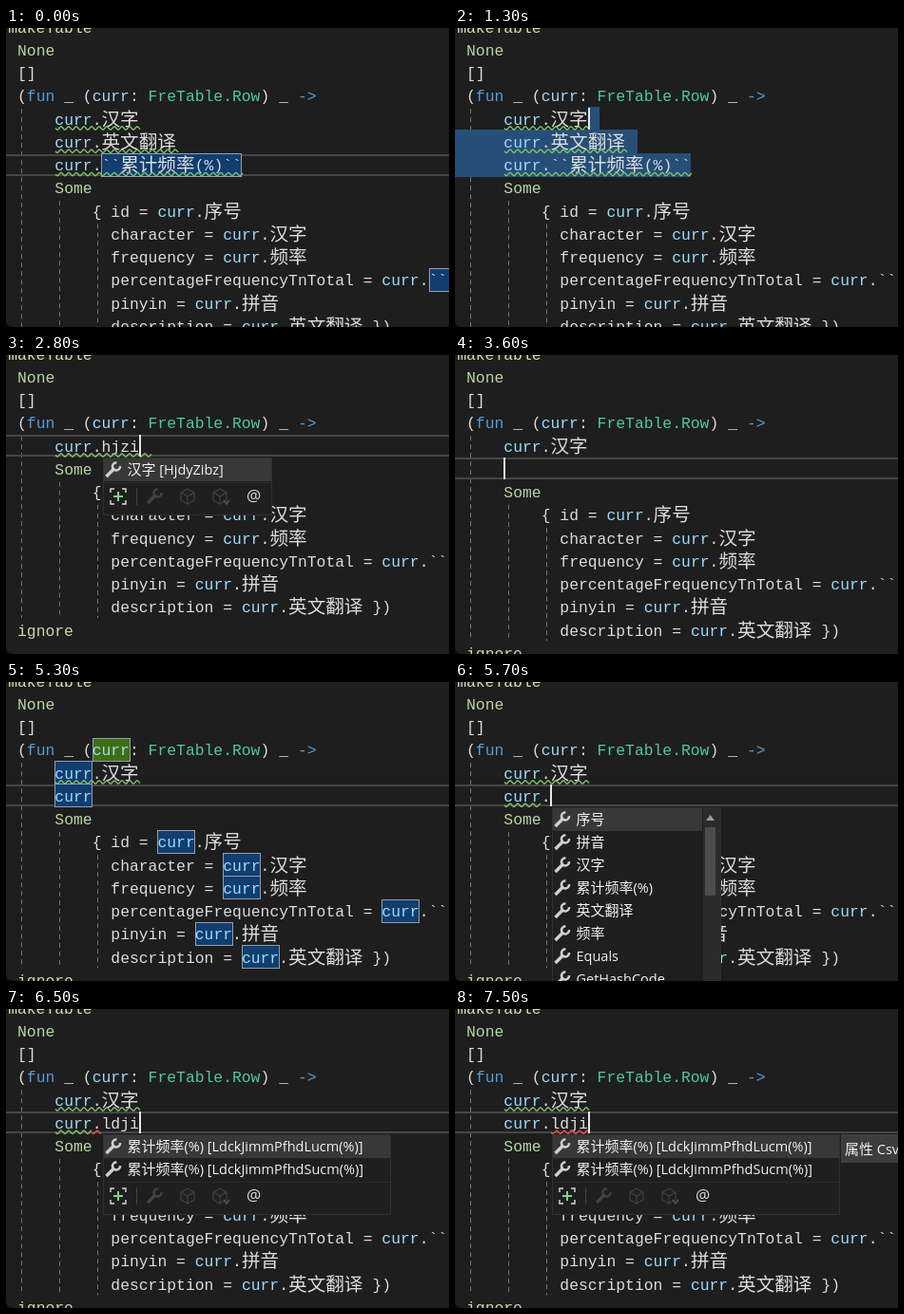
Write an HTML page with a canvas that moves like this. It is 466 px wide and 315 px high and loops after 8 s.

```html
<!DOCTYPE html>
<html lang="zh-CN">
<head>
<meta charset="utf-8">
<style>
html, body { margin: 0; width: 100%; height: 100%; overflow: hidden; background: #1e1e1e; }
canvas { display: block; }
</style>
</head>
<body>
<canvas id="stage" width="466" height="315"></canvas>
<script>
const ctx = document.getElementById('stage').getContext('2d');
const LOOP = 8000, LEFT = 12, CHAR = 9.83, PITCH = 24.25;
const CJK = '"Noto Sans CJK SC", "Noto Sans CJK JP", sans-serif';
const CODE_LATIN = '16.38px "Liberation Mono", monospace';
const CODE_CJK = '300 19.6px ' + CJK;
const GREEN = '#7fbf6a', RED = '#f0483f', WHITE = '#dcdcdc';
const BLUE_MARK = '#113d6f', GREEN_MARK = '#406f11';
const COLORS = {
  curr: '#9cdcfe', fun: '#569cd6', '->': '#569cd6', 'FreTable.Row': '#4ec9a0',
  None: '#b8d7a3', Some: '#b8d7a3', makeTable: '#dcdcaa', ignore: '#cdd6a6'
};
const TOKENS = /curr|fun|->|FreTable\.Row|None|Some|makeTable|ignore|[\u4e00-\u9fff]+|[^\u4e00-\u9fff]/g;
const isCjk = s => /[\u4e00-\u9fff]/.test(s);
const columns = s => [...s].reduce((n, c) => n + (isCjk(c) ? 2 : 1), 0);
const colX = col => LEFT + col * CHAR;
const lineTop = row => -13.8 + row * PITCH;
// Latest value whose start time has passed.
const stepAt = (t, steps) => steps.reduce((v, [start, next]) => t >= start ? next : v, undefined);
const between = (t, a, b) => t >= a && t < b;

const HEAD = [[-1, 'makeTable'], [0, 'None'], [0, '[]'], [0, '(fun _ (curr: FreTable.Row) _ ->']];
const TAIL = [
  [4, 'Some'], [8, '{ id = curr.序号'], [10, 'character = curr.汉字'], [10, 'frequency = curr.频率'],
  [10, 'percentageFrequencyTnTotal = curr.``'], [10, 'pinyin = curr.拼音'],
  [10, 'description = curr.英文翻译 })'], [0, 'ignore']
];
const MEMBERS = ['序号', '拼音', '汉字', '累计频率(%)', '英文翻译'];
const MATCHES = ['累计频率(%) [LdckJimmPfhdLucm(%)]', '累计频率(%) [LdckJimmPfhdSucm(%)]'];

function rect(x, y, w, h, fill, border) {
  ctx.fillStyle = fill;
  ctx.fillRect(x, y, w, h);
  if (!border) return;
  ctx.strokeStyle = border;
  ctx.lineWidth = 1;
  ctx.strokeRect(x + .5, y + .5, w - 1, h - 1);
}

function line(color, width, ...points) {
  ctx.strokeStyle = color;
  ctx.lineWidth = width;
  ctx.beginPath();
  points.forEach(([x, y]) => ctx.lineTo(x, y));
  ctx.stroke();
}

function drawCode(col, text, row) {
  const baseline = Math.round(lineTop(row) + 18.4);
  for (const token of text.match(TOKENS) || []) {
    const wide = isCjk(token);
    ctx.font = wide ? CODE_CJK : CODE_LATIN;
    ctx.fillStyle = COLORS[token] || WHITE;
    ctx.fillText(token, colX(col), baseline + (wide ? 1 : 0));
    col += columns(token);
  }
}

function mark(row, col, count, fill = BLUE_MARK) {
  const x = Math.round(colX(col)), y = Math.round(lineTop(row));
  rect(x, y, Math.round(count * CHAR) + 1, 25, fill, '#909faf');
}

function squiggle(row, from, to, color) {
  const y = lineTop(row) + 22.3, points = [];
  for (let x = from; x <= to; x++) points.push([x, y + 1.7 * Math.sin((x - from) * Math.PI / 4)]);
  line(color, 1.3, ...points);
}

function guide(x, first, last) {
  ctx.setLineDash([5, 4]);
  line('#747474', 1, [x + .5, lineTop(first) + 2], [x + .5, lineTop(last + 1)]);
  ctx.setLineDash([]);
}

// With emphasis, the first capital L (the typed letter) is bold.
function uiText(text, x, y, emphasis) {
  ctx.fillStyle = '#f0f0f0';
  for (const run of text.match(/[\u4e00-\u9fff]+|L|[^L\u4e00-\u9fff]+/g)) {
    const bold = emphasis && run === 'L';
    if (bold) emphasis = false;
    ctx.font = isCjk(run) ? '15px ' + CJK : (bold ? 'bold ' : '') + '14.5px "Open Sans", sans-serif';
    ctx.fillText(run, x, y + 4.5);
    x += ctx.measureText(run).width;
  }
}

function wrench(x, y, color) {
  line(color, 3.4, [x - 7, y + 7], [x + 1, y - 1]);
  ctx.lineWidth = 2.6;
  ctx.beginPath();
  ctx.arc(x + 3.5, y - 3.5, 4, -.1, 2 * Math.PI - 1.47);
  ctx.stroke();
}

function cube(x, y) {
  const dim = '#424242';
  line(dim, 1.2, [x, y - 8], [x + 7, y - 4], [x + 7, y + 4], [x, y + 8], [x - 7, y + 4], [x - 7, y - 4], [x, y - 8]);
  line(dim, 1.2, [x - 7, y - 4], [x, y], [x + 7, y - 4]);
  line(dim, 1.2, [x, y], [x, y + 8]);
}

function toolbar(top, right) {
  const y = top + 15;
  line('#2b2b2b', 1, [103, top + .5], [right - 1, top + .5]);
  for (const side of [-1, 1]) {
    line(WHITE, 1.4, [118 + side * 4, y - 8], [118 + side * 8, y - 8], [118 + side * 8, y - 4]);
    line(WHITE, 1.4, [118 + side * 4, y + 8], [118 + side * 8, y + 8], [118 + side * 8, y + 4]);
  }
  line('#7fd37f', 2, [113, y], [123, y]);
  line('#7fd37f', 2, [118, y - 5], [118, y + 5]);
  line('#424242', 1, [137.5, y - 9], [137.5, y + 9]);
  wrench(156, y, '#424242');
  cube(191, y);
  cube(225, y);
  line('#555', 1.6, [229, y + 4], [232, y + 8], [235, y + 4]);
  ctx.font = '17px "Open Sans", sans-serif';
  ctx.fillStyle = WHITE;
  ctx.fillText('@', 253, y + 5);
}

function popup(top, right, items, scrolls) {
  const height = scrolls ? 240 : items.length * 24 + 37;
  rect(102, top, right - 102, height, '#1f1f1f', '#303030');
  rect(103, top + 1, (scrolls ? right - 20 : right - 1) - 103, 24, '#383838');
  items.forEach((item, i) => {
    const y = top + 13 + i * 24;
    wrench(112.5, y, '#d0d0d0');
    uiText(item, 127.5, y, scrolls);
  });
  if (!scrolls) return toolbar(top + items.length * 24 + 2, right);
  rect(right - 19, top + 1, 18, height, '#2b2b2b');
  rect(right - 17, top + 21, 11, 72, '#4d4d4d');
  ctx.fillStyle = '#999';
  ctx.beginPath();
  ctx.moveTo(right - 16, top + 14);
  ctx.lineTo(right - 11.5, top + 8);
  ctx.lineTo(right - 7, top + 14);
  ctx.fill();
}

function drawPopups(t) {
  if (between(t, 2800, 3100)) popup(108, 280, ['汉字 [HjdyZibz]'], false);
  if (between(t, 5700, 6000)) popup(132, 280, [...MEMBERS, '频率', 'Equals', 'GetHashCode'], true);
  if (between(t, 6000, 6300)) popup(132, 405, [...MATCHES, '频率 [PfhdLucm]', ...MEMBERS], true);
  if (t >= 6300) popup(132, 405, MATCHES, false);
  if (t >= 6900) {
    rect(406, 132, 60, 30, '#3d3d3d');
    uiText('属性 Csv', 410, 148);
  }
}

function drawSelection(t) {
  const color = '#264f78', top = row => Math.round(lineTop(row));
  const start = t < 1500 ? colX(13) : colX(9);
  if (t >= 1300) {
    rect(start, top(4), 152 - start, 25, color);
    rect(0, top(5), 192, 25, color);
  } else {
    rect(colX(17), top(5), 12, 25, color);
  }
  rect(0, top(6), 248, 25, color);
}

function drawMarks(t) {
  if (t < 1200) {
    if (t < 1100) mark(6, 9, 15);
    mark(11, 44, 15);
  }
  if (between(t, 1600, 2000)) {
    mark(4, 9, 4);
    mark(9, 27, 4);
  }
  if (between(t, 2000, 2200)) mark(7, 27, 4);
  if (between(t, 5000, 5400)) {
    mark(3, 8, 4, GREEN_MARK);
    [[4, 4], [5, 4], [7, 15], [8, 22], [9, 22], [10, 39], [11, 19], [12, 24]].forEach(([row, col]) => mark(row, col, 4));
  }
}

function drawSquiggles(t, first) {
  if (t < 2000) {
    [141, 181, 249].forEach((right, i) => squiggle(4 + i, 52, right, GREEN));
  } else if (t < 3300) {
    squiggle(4, 52, t < 3100 ? colX(4 + columns(first)) + 14 : 141, GREEN);
  } else if (t >= 5200) {
    squiggle(4, 52, 141, GREEN);
  }
  if (between(t, 5400, 7200)) squiggle(5, 52, 90, GREEN);
  if (between(t, 6000, 7200)) squiggle(5, 90, 100, RED);
  if (t >= 7200) squiggle(5, 101, 142, RED);
}

function caretPosition(t, first, second) {
  if (t < 1100) return [6, 24];
  if (t < 1300) return [5, 17];
  if (t < 2000) return [4, t < 1500 ? 13 : 9];
  return t < 3600 ? [4, 4 + columns(first)] : [5, 4 + columns(second)];
}

function draw(t) {
  const first = 'curr.' + stepAt(t, [[0, '汉字'], [2000, 'h'], [2200, 'hj'], [2500, 'hjz'], [2600, 'hjzi'], [3100, '汉字']]);
  const second = stepAt(t, [[0, ''], [4700, 'curr'], [5400, 'curr.'], [6000, 'curr.l'], [6200, 'curr.ld'], [6400, 'curr.ldj'], [6500, 'curr.ldji']]);
  const extra = t < 2000 ? ['curr.英文翻译', 'curr.``累计频率(%)``'] : t < 3600 ? [] : [second];
  const lines = [...HEAD, ...[first, ...extra].map(text => [4, text]), ...TAIL];
  const some = 5 + extra.length;
  const [caretRow, caretCol] = caretPosition(t, first, second);
  const caretTop = Math.round(lineTop(caretRow)) + 1;

  rect(0, 0, 466, 315, '#1e1e1e');
  guide(16, 4, some + 6);
  guide(56, some + 1, some + 6);
  guide(96, some + 2, some + 6);

  if (between(t, 1100, 2000)) {
    drawSelection(t);
  } else {
    rect(0, caretTop, 466, 2, '#464646');
    rect(0, caretTop + 21, 466, 2, '#464646');
  }
  drawMarks(t);
  lines.forEach(([col, text], row) => drawCode(col, text, row));
  drawSquiggles(t, first);

  const hidden = [[0, 800], [4000, 4500], [5200, 5400], [7000, 7500]].some(([a, b]) => between(t, a, b));
  if (!hidden) rect(Math.round(colX(caretCol)), caretTop, 2, 23, '#e6e6e6');
  drawPopups(t);

  // Rounded window corner
  ctx.fillStyle = '#0a0a0a';
  ctx.beginPath();
  ctx.moveTo(0, 307);
  ctx.quadraticCurveTo(0, 315, 8, 315);
  ctx.lineTo(0, 315);
  ctx.fill();
}

const begin = performance.now();
function tick() {
  draw((performance.now() - begin) % LOOP);
  requestAnimationFrame(tick);
}
tick();
</script>
</body>
</html>
```
